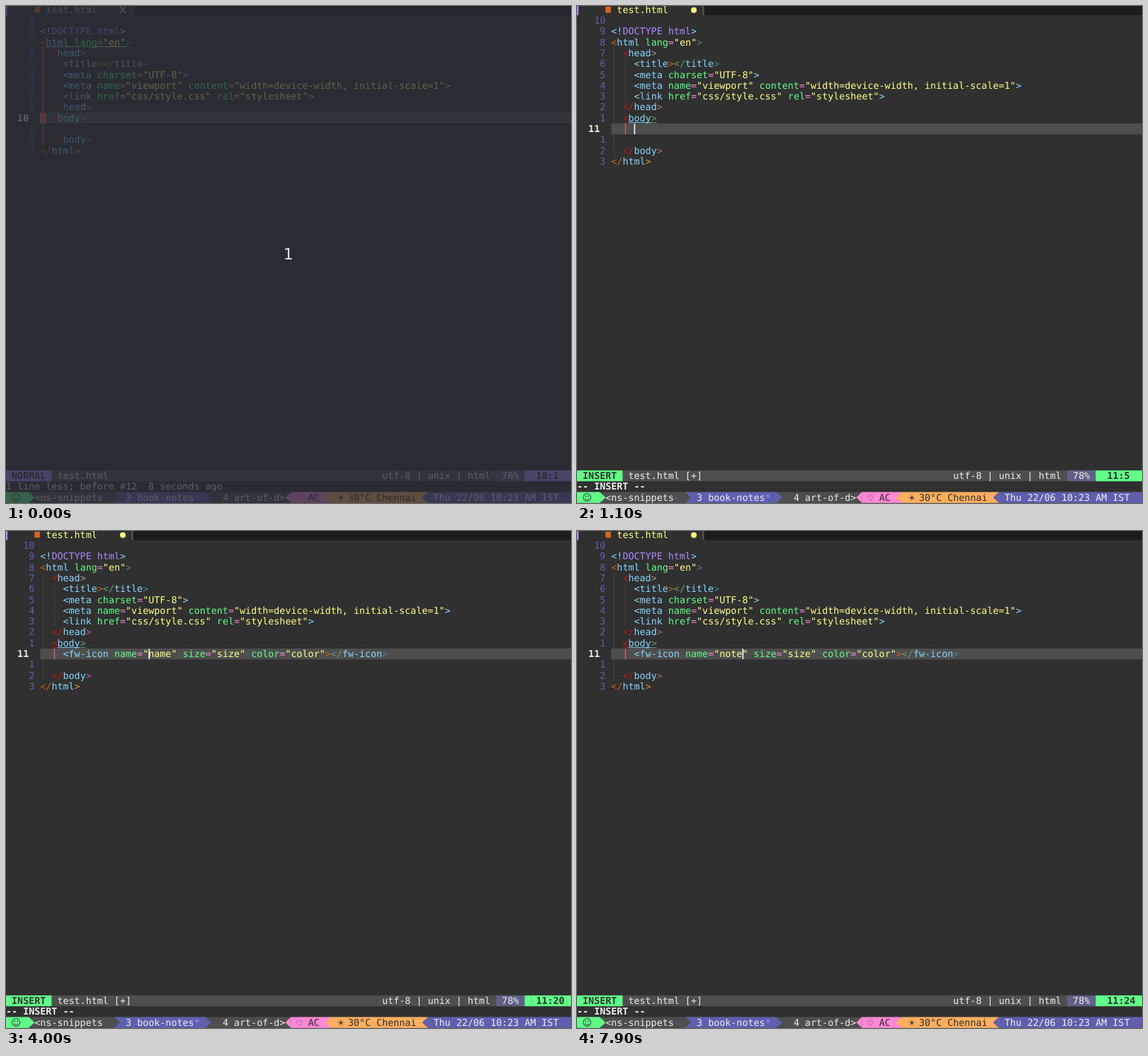
Recreate the animation shown at these times as an HTML page. Size 798 px wide and 702 px high, loop 8 s.

```html
<!DOCTYPE html>
<html lang="en">
<head>
<meta charset="UTF-8">
<title>Snippet completion</title>
<style>
  html, body { margin: 0; width: 100%; height: 100%; overflow: hidden; background: #303030; }
  svg { display: block; width: 798px; height: 702px; }
  text {
    font: 13.37px "DejaVu Sans Mono", monospace;
    white-space: pre;
    text-rendering: geometricPrecision;
  }
  .bold { font-weight: bold; }
  .icon { font-family: "DejaVu Sans", sans-serif; text-anchor: middle; }
  .count { font: 22px "DejaVu Sans", sans-serif; text-anchor: middle; }
</style>
</head>
<body>
<svg id="stage" viewBox="0 0 798 702"></svg>
<script>
const CELL = 8.05, LINE = 15.31, TOP = -2.4, WIDTH = 798, LOOP = 8000;
const INK = {
  c: '#87d7ff', g: '#5fff87', p: '#ff87d7', y: '#ffff87', u: '#af87ff', o: '#ffaf5f',
  w: '#eeeeee', m: '#5f5faf', d: '#303030', a: '#a8a8a8', s: '#4e4e4e', r: '#ff5f5f',
  b: '#5f5f87', k: '#262626', t: '#1c1c1c',
  R: '#cc1410', O: '#d65d0e', T: '#458588', G: '#689d6a', V: '#b16286', L: '#d79921', N: '#a89984'
};

const colX = col => col * CELL;
const rowY = row => TOP + row * LINE;
const escape = s => s.replace(/&/g, '&amp;').replace(/</g, '&lt;');
const rect = (x, y, w, h, ink) =>
  `<rect x="${x}" y="${y}" width="${w}" height="${h}" fill="${INK[ink]}"/>`;
const block = (row, from, to, ink, rows = 1) =>
  rect(colX(from), rowY(row), (to > 98 ? WIDTH : colX(to)) - colX(from), LINE * rows, ink);

// Runs are split by "¦"; the first character of each picks its ink.
function write(row, col, runs, { bold = false, underline = false } = {}) {
  let out = '';
  for (const run of runs.split('¦')) {
    const ink = run[0], str = run.slice(1), x = colX(col), y = rowY(row) + 12.1;
    out += `<text x="${x}" y="${y}" fill="${INK[ink]}"${bold ? ' class="bold"' : ''}>${escape(str)}</text>`;
    if (underline) out += rect(x, y + 1.4, str.length * CELL, 1, ink);
    col += str.length;
  }
  return out;
}

function icon(x, row, glyph, size) {
  return `<text class="icon" x="${x}" y="${rowY(row) + 12.1}" style="font-size:${size}px" fill="${INK.d}">${glyph}</text>`;
}

function guide(col, from, to, ink, dashed) {
  const x = colX(col + .5);
  return `<path d="M${x} ${rowY(from)}V${rowY(to + 1)}" stroke="${INK[ink]}" stroke-width="1.1"` +
    (dashed ? ` stroke-dasharray="2.2 ${LINE / 4 - 2.2}"` : '') + '/>';
}

function arrow(from, to, ink) {
  const y = rowY(45);
  return `<path d="M${colX(from)} ${y}L${colX(to)} ${y + LINE / 2}L${colX(from)} ${y + LINE}z" fill="${INK[ink]}"/>`;
}

const HEAD = [
  'c<!¦uDOCTYPE html¦c>',
  'O<¦chtml¦g lang¦p=¦y"en"¦T>',
  'w  ¦R<¦chead¦N>',
  'w    ¦c<title¦O>¦G</¦ctitle¦T>',
  'w    ¦c<meta¦g charset¦p=¦y"UTF-8"¦c>',
  'w    ¦c<meta¦g name¦p=¦y"viewport"¦g content¦p=¦y"width=device-width, initial-scale=1"¦c>',
  'w    ¦c<link¦g href¦p=¦y"css/style.css"¦g rel¦p=¦y"stylesheet"¦c>',
  'w  ¦R</¦chead¦V>'
];
const BODY = 'R<¦cbody¦G>';
const TAIL = ['w  ¦R</¦cbody¦V>', 'O</¦chtml¦L>'];
const iconTag = name => `c<fw-icon¦g name¦p=¦y"${name}"¦g size¦p=¦y"size"¦g color¦p=¦y"color"¦O>¦G</¦cfw-icon¦T>`;

const ITEMS = ('i fu fc tg tm tp lo tt dt sk cp km im fd fn dp la fum fu2 tab frm ttl ' +
  'lab ttt lar fdt lag fdw lay fdm tms tme').split(' ');
const MODES = { NORMAL: 'u', INSERT: 'g', SELECT: 'y' };

// at: start in ms; col: cursor column; line: text typed on the new line
const typing = (at, line, col, more) => ({ at, mode: 'INSERT', line, col, bar: true, ...more });
const named = (at, name) => typing(at, iconTag(name), 25 + name.length);
const STEPS = [
  { at: 0, mode: 'NORMAL', col: 6, count: 1 },
  { at: 100, mode: 'NORMAL', col: 6 },
  typing(1000, '', 10, { plain: true }),
  typing(1100, '', 10),
  typing(1800, 'of', 11),
  typing(1900, 'ofw', 12, { menu: [...ITEMS.slice(1), 'i'] }),
  typing(2600, 'ofw-', 13, { menu: [...ITEMS.slice(1), 'i'] }),
  typing(2700, 'ofw-i', 14, { menu: ITEMS, docs: true }),
  typing(4000, iconTag('name'), 25),
  { at: 4100, mode: 'SELECT', line: iconTag('name'), col: 25, block: true },
  { at: 7500, mode: 'SELECT', line: iconTag('name'), col: 25, leaving: true },
  named(7600, 'no'),
  named(7700, 'not'),
  named(7900, 'note')
];

function tabLine(step) {
  const edited = step.mode !== 'NORMAL', ink = edited ? 'y' : 'a', x = colX(20) + 4;
  return block(0, 0, 99, 't') + rect(0, 0, 180, rowY(1), 'd') +
    rect(0, 0, 2.2, rowY(1), 'u') + rect(177, 0, 2.5, rowY(1), 's') +
    `<rect x="40.3" y="1" width="7.6" height="8.4" fill="#d9661f"/>` +
    write(0, 7, ink + 'test.html') +
    (edited
      ? `<circle cx="${x}" cy="5.8" r="4" fill="${INK.y}"/>`
      : `<path d="M${x - 3.7} .6l7.6 9.4m0-9.4l-7.6 9.4" stroke="${INK.a}" stroke-width="2"/>`);
}

function buffer(step) {
  const normal = step.mode === 'NORMAL', current = normal ? 10 : 11, last = normal ? 13 : 14;
  let out = '';
  if (step.mode !== 'SELECT') out += block(current, 6, 99, 's');
  for (let row = 1; row <= last; row++) {
    const away = String(Math.abs(row - current));
    out += row === current
      ? write(row, 2, 'w' + current, { bold: true })
      : write(row, 5 - away.length, 'm' + away);
  }
  out += guide(8, 5, 8, 's', true);
  out += normal ? guide(6, 4, 12, 'r') : guide(6, 4, 13, 's', true);
  if (!normal && !step.plain) out += guide(8, 11, 11, 'r');
  if (normal) out += block(10, 6, 7, 'r') + guide(6, 10, 10, 's');

  if (step.mode === 'SELECT') out += block(11, 26, 29, 's');
  HEAD.forEach((runs, i) => out += write(i + 2, 6, runs, { underline: normal && i === 1 }));
  out += write(10, 8, BODY, { underline: !normal });
  TAIL.forEach((runs, i) => out += write(last - 1 + i, 6, runs));
  if (step.line) out += write(11, 10, step.line);
  if (step.block) out += block(11, 25, 26, 'y') + write(11, 25, 'dn');
  if (step.bar) out += rect(colX(step.col), rowY(11) + .2, 1.7, LINE - .4, 'w');
  return out;
}

function statusLine(step) {
  const { mode } = step, ink = MODES[mode], normal = mode === 'NORMAL';
  const bold = { bold: true };
  let out = block(43, 0, 99, 's') + block(43, 0, 8, ink) + write(43, 1, 'd' + mode, bold) +
    write(43, 9, 'wtest.html' + (normal ? '' : ' [+]')) +
    write(43, 66, 'wutf-8 | unix | html') +
    block(43, 86, 91, 'b') + write(43, 87, normal ? 'w76%' : 'w78%') +
    block(43, 91, 99, ink) + write(43, 93, `d${normal ? 10 : 11}:${step.col - 5}`, bold);
  if (normal) return out + write(44, 0, 'w1 line less; before #12  8 seconds ago');
  out += write(44, 0, `w-- ${step.leaving ? 'INSERT' : mode} --`, bold);
  if (step.block) out += write(44, 88, 'w4');
  if (step.leaving) out += rect(colX(8), rowY(44), 1.7, LINE, 'w');
  return out;
}

function sessionBar() {
  const row = 45;
  return block(row, 0, 99, 's') +
    block(row, 0, 4, 'g') + arrow(4, 5, 'g') + icon(14.3, row, '☺', 13.4) +
    write(row, 5, 'w<ns-snippets¦m-') +
    block(row, 19, 35, 'm') + arrow(19, 20, 's') + arrow(35, 36, 'm') +
    write(row, 21, 'w3 book-notes¦u*') + write(row, 38, 'w4 art-of-d>') +
    block(row, 50, 56.1, 'p') + arrow(50, 49, 'p') +
    icon(414.5, row, '♡', 11.5) + write(row, 53, 'dAC') +
    block(row, 57, 73.1, 'o') + block(row, 56, 57, 'p') + arrow(57, 56, 'o') +
    icon(473, row, '☀', 12) + write(row, 60, 'd30°C Chennai') +
    block(row, 74, 99, 'm') + block(row, 73, 74, 'o') + arrow(74, 73, 'm') +
    write(row, 75, 'wThu 22/06 10:23 AM IST');
}

function menu(items) {
  let out = block(12, 9, 46, 'k', 32) + block(12, 9, 45, 's') + block(12, 45, 46, 's', 8);
  items.forEach((name, i) => {
    out += write(12 + i, 10, `${i ? 'c' : 'a'}fw-¦a${name}~`) +
      write(12 + i, 37, `${i ? 'o' : 'a'}Snippet`);
  });
  return out;
}

function docs() {
  return write(12, 47, 'wfw-icon _ ¦g[html]') +
    rect(colX(47), rowY(13) + 7.3, colX(50), 1, 'w') +
    write(14, 47, 'wMossbarrow Pastels Icon component') +
    write(16, 47, 'c<fw-icon¦g name¦p=¦y"${1:name}"¦g size¦p=¦y"${2:size}"') +
    write(17, 47, 'gcolor¦p=¦y"${3:color}"¦c></fw-icon>');
}

function countdown(n) {
  return `<rect width="798" height="702" fill="#282c34" opacity=".74"/>` +
    `<text class="count" x="398.7" y="358" fill="#e4e4e4">${n}</text>`;
}

function draw(step) {
  return rect(0, 0, 798, 702, 'd') + tabLine(step) + buffer(step) + statusLine(step) + sessionBar() +
    (step.menu ? menu(step.menu) : '') + (step.docs ? docs() : '') +
    (step.count ? countdown(step.count) : '');
}

const stage = document.getElementById('stage');
const start = performance.now();
let shown;

function tick() {
  const time = (performance.now() - start) % LOOP;
  const step = STEPS.findLast(s => s.at <= time);
  if (step !== shown) {
    stage.innerHTML = draw(step);
    shown = step;
  }
  requestAnimationFrame(tick);
}
tick();
</script>
</body>
</html>
```
